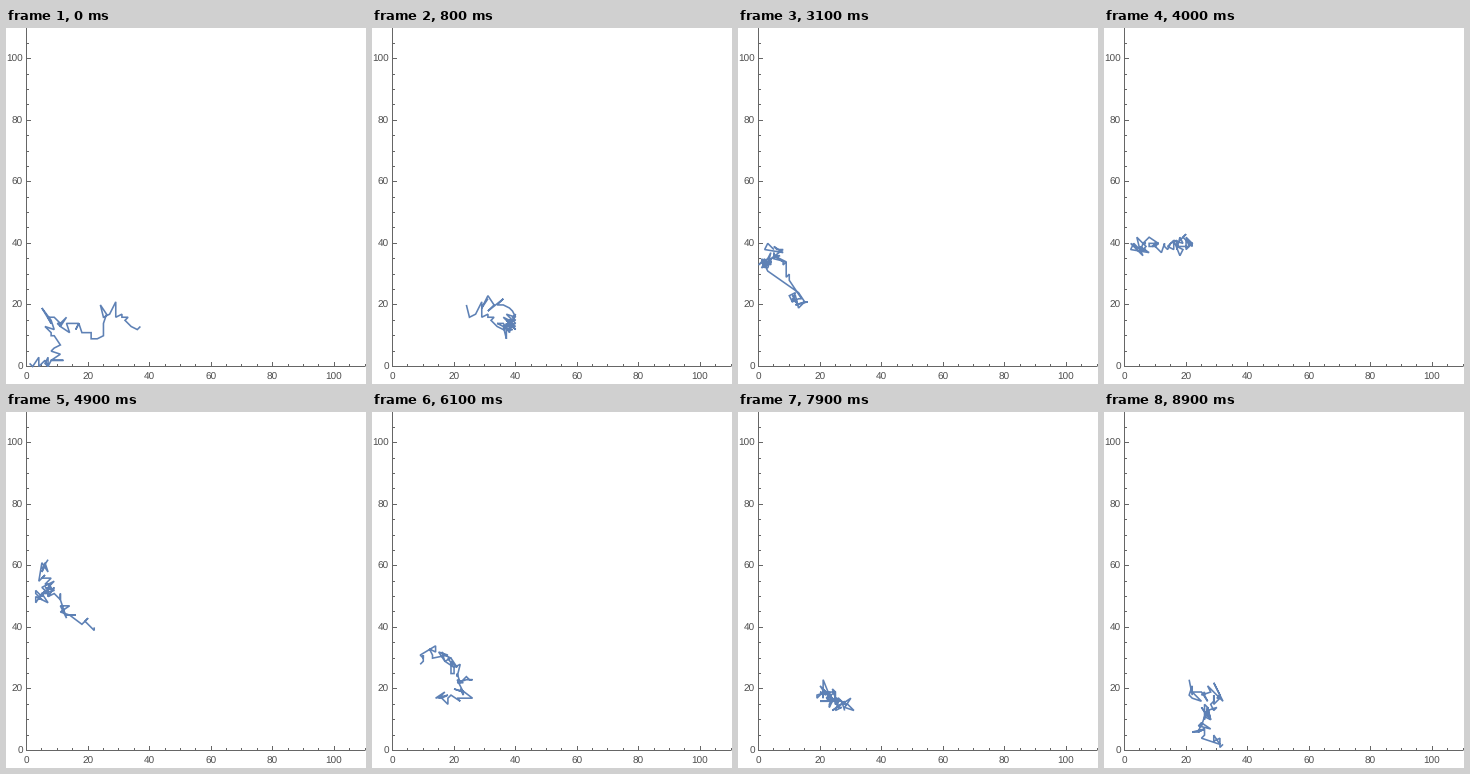
A matplotlib script that plays this animation: 360 px wide and 356 px high, repeating every 9 s.

```python
import numpy as np
import matplotlib.pyplot as plt
from matplotlib.animation import FuncAnimation

W, H, DPI = 360, 356, 100
FRAMES, STEP_MS = 90, 100
SPAN, RATE = 10, 6             # trail length in frames, vertices per frame
X0, Y0, UNIT = 20.5, 338.5, 3.078
INK, BLUE = "#666666", "#5e81b5"

# Stops of the drifting walker: frame time, x, y
STOPS = np.array([
    (0, 1, 1), (2, 12, 2), (4, 6, 16), (6, 14, 14), (7.5, 25, 9),
    (8, 26, 20), (10, 37, 12),
    (16, 39, 16), (17.5, 31, 22), (21, 31, 23), (22, 41, 12), (23.5, 30, 11),
    (25, 20, 18), (26, 12, 24),
    (31, 3, 34), (34, 2, 34), (34.2, 13, 21), (37, 12, 23), (38, 8, 35),
    (41, 4, 40),
    (49, 21, 40), (52, 8, 50), (54, 3, 50), (56, 8, 53), (59, 4, 60),
    (61, 9, 31), (64, 17, 31), (67, 24, 23), (69, 22, 18), (71, 14, 18),
    (75, 24, 20), (79, 28, 14),
    (89, 20, 20), (92, 30, 18), (97, 24, 7), (99, 33, 3)])

# The walker stays on whole coordinates and jitters around its route
rng = np.random.default_rng(7)
times = np.arange((FRAMES + SPAN) * RATE) / RATE
route = np.column_stack([np.interp(times, STOPS[:, 0], STOPS[:, i])
                         for i in (1, 2)])
spots = np.maximum(np.rint(route + rng.normal(0, 1.4, route.shape)), 0)
trail = spots * UNIT * [1, -1] + [X0, Y0]

plt.rcParams["text.hinting"] = "none"
fig = plt.figure(figsize=(W / DPI, H / DPI), dpi=DPI, facecolor="white")
ax = fig.add_axes([0, 0, 1, 1])
ax.set(xlim=(0, W), ylim=(H, 0))
ax.axis("off")


def px(n):
    return n * 72 / DPI


def rule(xs, ys):
    ax.plot(xs, ys, color=INK, lw=px(1), solid_capstyle="butt", snap=False)


font = dict(family="Liberation Sans", size=px(10), color="#4d4d4d",
            va="center_baseline")
rule([X0, W - 1], [Y0, Y0])
rule([X0, X0], [0, Y0 + 0.5])
for v in range(0, 111, 5):
    major = v % 20 == 0
    size = 4.5 if major else 2.5
    x, y = np.floor(X0 + UNIT * v) + 0.5, np.floor(Y0 - UNIT * v) + 0.5
    rule([x, x], [Y0, Y0 - size])
    rule([X0, X0 + size], [y, y])
    if major:
        ax.text(x - 0.5, 348, str(v), ha="center", **font)
        ax.text(17, y, str(v), ha="right", **font)

line, = ax.plot([], [], color=BLUE, lw=px(1.6), solid_joinstyle="miter",
                solid_capstyle="butt", snap=False)


def draw(k):
    seen = slice(k * RATE, (k + SPAN) * RATE)
    line.set_data(trail[seen, 0], trail[seen, 1])
    return line,


anim = FuncAnimation(fig, draw, frames=FRAMES, interval=STEP_MS,
                     repeat=True, repeat_delay=0)
plt.show()
```
